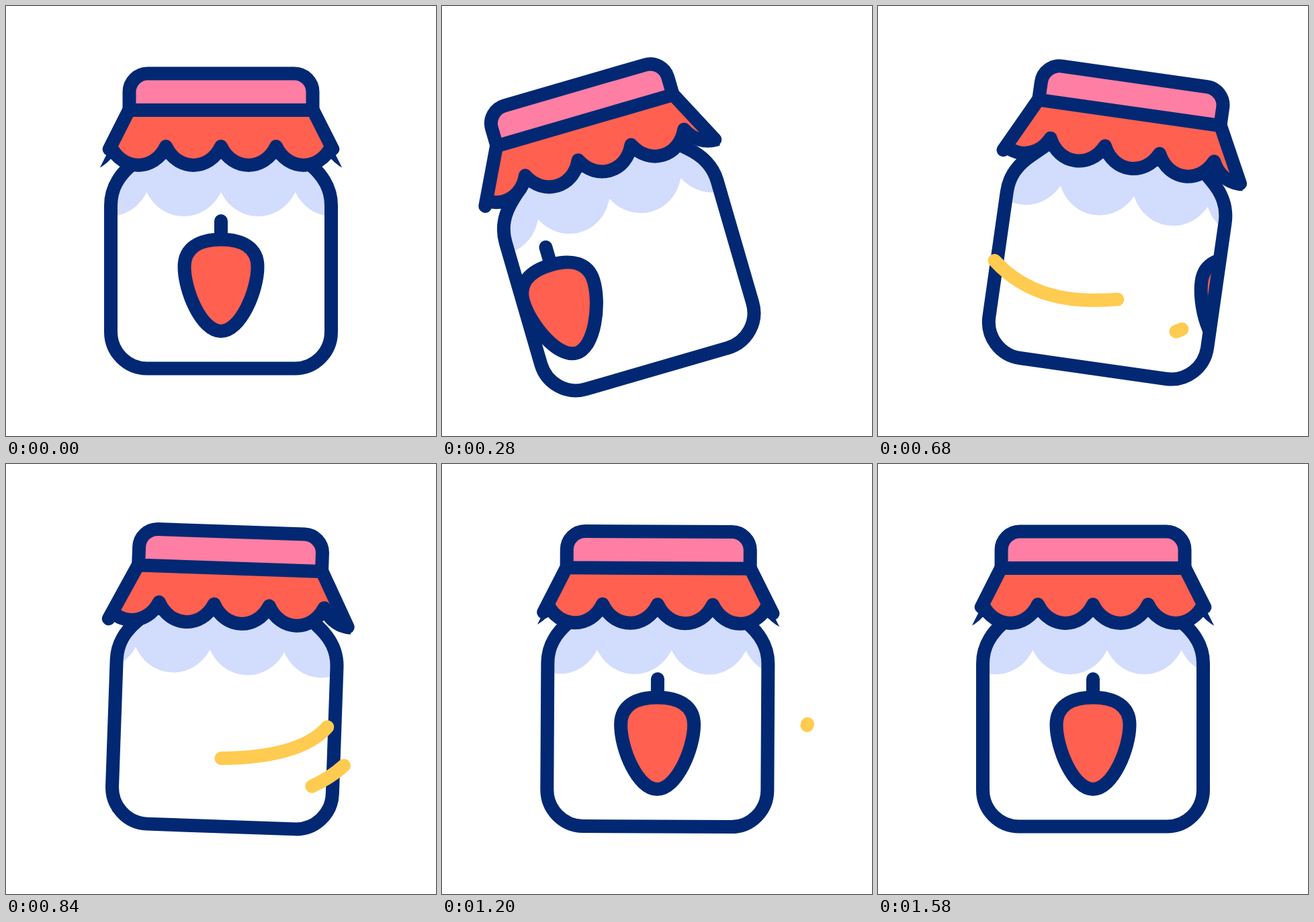
Write an HTML page that moves like this. It is 640 px wide and 640 px high and loops after 2.4 s.

```html
<!DOCTYPE html>
<html lang="en">
<head>
<meta charset="utf-8">
<title>Jam jar</title>
<style>
  html, body { margin: 0; width: 100%; height: 100%; overflow: hidden; background: #fff; }
  svg { display: block; width: 100vw; height: 100vh; }
  .line { fill: none; stroke: #022873; stroke-width: 20; stroke-linecap: round; stroke-linejoin: round; }
  .pink { fill: #ff7ea3; }
  .red { fill: #ff6050; }
  .pale { fill: #d2dcfd; }
  .swoosh { fill: none; stroke: #ffcb50; stroke-width: 20; stroke-linecap: round; }
</style>
</head>
<body>
<svg viewBox="0 0 640 640">
  <defs>
    <path id="glass" d="M208 217L185 238C167 254 156 272 156 297V485C156 515 180 539.5 210 539.5H430C460 539.5 484 515 484 485V297C484 272 473 254 455 238L432 217"/>
    <clipPath id="inside"><use href="#glass"/></clipPath>
    <clipPath id="cloth"><path d="M183 155H457L510 260H130Z"/></clipPath>
  </defs>
  <g id="jar">
    <g clip-path="url(#inside)">
      <path id="drips" class="pale"/>
      <g id="berry">
        <path class="line" d="M320 320V345"/>
        <path class="line red" style="fill:#ff6050" d="M320 347.5C352 347.5 374.5 360 374.5 388C374.5 424 349 484 320 484C291 484 265.5 424 265.5 388C265.5 360 288 347.5 320 347.5Z"/>
      </g>
    </g>
    <use href="#glass" class="line"/>
    <g clip-path="url(#cloth)">
      <path id="frill" class="line" style="fill:#ff6050"/>
    </g>
    <path id="sides" class="line"/>
    <path class="line" style="fill:#ff7ea3" d="M183.5 155V128A27.5 27.5 0 0 1 211 100.5H429A27.5 27.5 0 0 1 456.5 128V155Z"/>
  </g>
  <path id="upper" class="swoosh" pathLength="1" d="M147 342C180 400 235 438 320 438C410 438 488 415 495 353"/>
  <path id="lower" class="swoosh" pathLength="1" d="M443.5 484.5C488 468 528 435 544 387"/>
</svg>
<script>
const LOOP = 2400, FRILL = 82, DRIP = 110.6, TURN = 635;
const $ = id => document.getElementById(id);

// Smooth monotone curve through [time, value] keys, flat at peaks and ends
function track(...keys) {
  const n = keys.length - 1;
  const rate = i => (keys[i + 1][1] - keys[i][1]) / (keys[i + 1][0] - keys[i][0]);
  const slope = keys.map((_, i) => {
    if (i === 0 || i === n) return 0;
    const a = rate(i - 1), b = rate(i);
    return a * b > 0 ? 2 * a * b / (a + b) : 0;
  });
  return t => {
    if (t <= keys[0][0]) return keys[0][1];
    if (t >= keys[n][0]) return keys[n][1];
    let i = 0;
    while (t > keys[i + 1][0]) i++;
    const [t0, v0] = keys[i], [t1, v1] = keys[i + 1];
    const h = t1 - t0, u = (t - t0) / h, w = 1 - u;
    return v0 * (1 + 2 * u) * w * w + v1 * (3 - 2 * u) * u * u
      + h * u * w * (slope[i] * w - slope[i + 1] * u);
  };
}

const tilt = track([0, 0], [280, -16.15], [340, -17.6], [520, -3.2], [680, 8.1],
  [1000, -3.95], [1200, 0.3], [1310, 2], [1590, 0]);
const drift = track([0, 0], [280, -108], [295, -109], [520, -18], [680, 134], [1000, 455], [1215, 7 * FRILL]);
const roll = track([0, 0], [270, -109], [520, 27], [680, 195], [1000, TURN - 91], [1210, TURN]);
const flare = track([0, 0], [200, 1], [1060, 1], [1200, 0.37], [1290, 0]);
const swooshes = [
  ['upper', track([570, 0], [680, 0.107], [1000, 0.89], [1100, 1]),
            track([400, 0], [520, 0.21], [680, 0.58], [950, 1])],
  ['lower', track([760, 0], [1000, 0.49], [1200, 0.985], [1225, 1]),
            track([600, 0], [680, 0.065], [1000, 0.9], [1110, 1])]
];

// Row of hanging scallops, closed along the given top
function scallops(shift, step, y, bulge, top) {
  const x = 320 + shift % step - 5 * step, c = step * 0.215;
  const arc = `c${c} ${bulge} ${step - c} ${bulge} ${step} 0`;
  return `M${x} ${y}` + arc.repeat(10) + `V${top}H${x}Z`;
}

function draw(t) {
  $('jar').setAttribute('transform', `rotate(${tilt(t)} 320 540)`);

  const x = drift(t), r = roll(t);
  $('frill').setAttribute('d', scallops(x, FRILL, 209, 37.3, 120));
  $('drips').setAttribute('d', scallops(x, DRIP, 277, 48, 200));
  $('berry').setAttribute('transform', `translate(${r > TURN / 2 ? r - TURN : r} 0)`);

  const y = 213 + 23.3 * flare(t), half = 137 + 0.505 * (y - 155);
  $('sides').setAttribute('d', `M183 155L${320 - half} ${y}M457 155L${320 + half} ${y}`);

  for (const [id, from, to] of swooshes) {
    const a = from(t), b = to(t), s = $(id).style;
    s.display = b > a ? '' : 'none';
    s.strokeDasharray = `${b - a} 3`;
    s.strokeDashoffset = -a;
  }
}

const start = performance.now();
function tick() {
  draw((performance.now() - start) % LOOP);
  requestAnimationFrame(tick);
}
draw(0);
requestAnimationFrame(tick);
</script>
</body>
</html>
```
